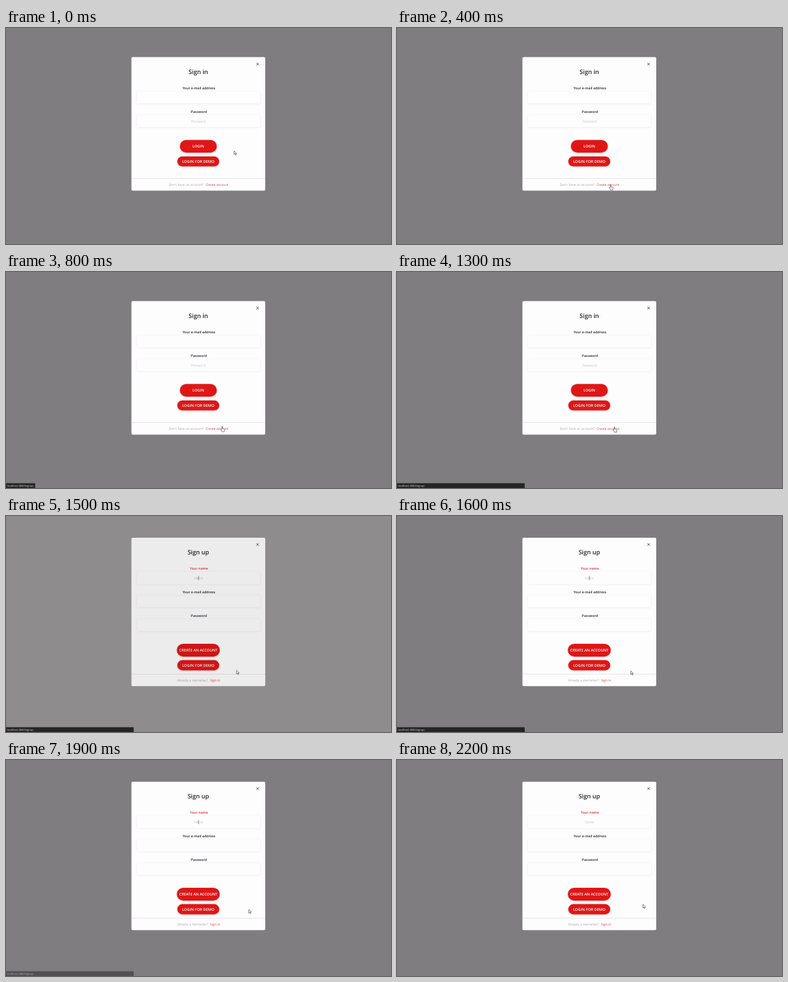
Write an HTML page that moves like this. It is 600x338 px and loops after 2400 ms.

```html
<!DOCTYPE html>
<html lang="en">
<head>
<meta charset="utf-8">
<title>Sign in to sign up</title>
<style>
html, body { margin: 0; width: 100%; height: 100%; overflow: hidden; background: #7f7d7f; }
svg { display: block; width: 100%; height: 100%; }
text { font-family: "Open Sans", "Noto Sans", sans-serif; text-rendering: geometricPrecision; }
</style>
</head>
<body>
<svg id="stage" viewBox="0 0 600 338" xmlns="http://www.w3.org/2000/svg"></svg>
<script>
const LOOP = 2400, STEP = 100;
const RED = '#df1719', INK = '#252427', GREY = '#a9a7aa';
const stage = document.getElementById('stage');

const label = (x, y, size, str, fill = INK, weight = 600, anchor = 'middle', id = '') =>
  `<text ${id && `id="${id}"`} x="${x}" y="${y}" font-size="${size}" font-weight="${weight}" fill="${fill}" text-anchor="${anchor}">${str}</text>`;

const box = (x, y, w, h, r, fill, extra = '') =>
  `<rect x="${x}" y="${y}" width="${w}" height="${h}" rx="${r}" fill="${fill}" ${extra}/>`;

const field = (y, hint = '') =>
  box(204, y, 192, 18.5, 2, '#fefdfe', 'filter="url(#soft)"') +
  (hint && label(300, y + 11, 5, hint, '#bfbdc0', 400));

const button = (x, y, w, h, str) =>
  box(x, y, w, h, h / 2, RED, 'filter="url(#lift)"') +
  label(x + w / 2, y + h / 2 + 2.1, 5.85, str, '#fff');

const cross = y =>
  `<path d="M390.2 ${y - 1.9}l3.8 3.8m0-3.8l-3.8 3.8" stroke="#333" stroke-width=".85" fill="none"/>`;

const footer = (y, ask, askX, link, linkX) =>
  box(195.5, y, 208.5, 1, 0, '#e6e4e7') +
  label(askX, y + 12, 5.05, ask, GREY, 400, 'start') +
  label(linkX, y + 12, 5.05, link, '#e23a3c', 400, 'start');

stage.innerHTML = `
  <defs>
    <filter id="soft" x="-5%" y="-40%" width="110%" height="180%">
      <feDropShadow dx="0" dy=".4" stdDeviation="1.7" flood-color="#504060" flood-opacity=".1"/>
    </filter>
    <filter id="lift" x="-10%" y="-30%" width="120%" height="170%">
      <feDropShadow dx="0" dy=".6" stdDeviation=".8" flood-color="#400" flood-opacity=".3"/>
    </filter>
  </defs>
  <rect id="back" width="600" height="338"/>
  <g id="signin">
    ${box(195.5, 45.5, 208.5, 209, 2, '#fefdfe')}
    ${cross(56.5)}
    ${label(299.7, 71.7, 9.5, 'Sign in')}
    ${label(300.6, 96, 5.4, 'Your e-mail address')}
    ${field(99.5)}
    ${label(300.6, 132.5, 5.4, 'Password')}
    ${field(136.5, 'Password')}
    ${button(271, 175.2, 57.5, 19.8, 'LOGIN')}
    ${button(267, 201, 65.3, 15.6, 'LOGIN FOR DEMO')}
    ${footer(235, 'Don\'t have an account?', 253.4, 'Create account', 311.2)}
  </g>
  <g id="signup">
    <rect id="panel" x="195.5" y="34" width="208.5" height="232.3" rx="2"/>
    <g id="form">
      ${cross(44.6)}
      ${label(299.7, 59.6, 9.5, 'Sign up')}
      ${label(300.7, 84, 5.4, 'Your name', INK, 600, 'middle', 'name')}
      ${field(87.7, 'Name')}
      ${box(299.6, 93.6, .8, 6.8, 0, '#666', 'id="caret"')}
      ${label(300.6, 120.7, 5.4, 'Your e-mail address')}
      ${field(124.3)}
      ${label(300.6, 157.5, 5.4, 'Password')}
      ${field(161.2)}
      ${button(266.3, 199.9, 66.8, 20, 'CREATE AN ACCOUNT')}
      ${button(267, 225.6, 65.3, 15.8, 'LOGIN FOR DEMO')}
      ${footer(247, 'Already a memeber?', 266.5, 'Sign in', 318)}
    </g>
    ${box(195.5, 34, 208.5, 232.3, 2, '#000', 'id="shade"')}
  </g>
  <g id="status">
    <rect id="bar" x="-2" y="330.5" height="10" rx="1" fill="#252526"/>
    ${label(1.4, 336, 4.05, 'localhost:3000/signup', '#dcdcdc', 400, 'start')}
  </g>
  <path id="arrow" d="M.3 .3V6l1.4-1.2 1 2.1.9-.4-1-2.1h1.9z" fill="#f8f8f8" stroke="#333" stroke-width=".6" stroke-linejoin="round"/>
  <path id="hand" d="M-.7 .8C-.7-.1 .5-.1 .5 .8V3.4L3 3.8Q3.9 4 3.8 5L3.4 7.2V8.4H-.6V7.4L-2.5 5Q-2.4 4-1.5 4.4L-.7 5.1Z" fill="#fff" stroke="#333" stroke-width=".6" stroke-linejoin="round"/>`;

const part = id => document.getElementById(id);
const set = (id, attrs) => {
  for (const k in attrs) part(id).setAttribute(k, attrs[k]);
};
const show = (id, on) => set(id, { opacity: +on });

// Pointer keys: time, x, y. Each place is held until the next key.
const trail = [
  [0, 355, 192], [100, 352, 203], [200, 343, 227], [300, 332, 246],
  [400, 333, 245], [500, 335, 243], [600, 337, 241.4], [1300, 339, 242.2],
  [1400, 345.8, 242.4], [1500, 359, 241.2], [1600, 364, 242], [1700, 369, 240.5],
  [1800, 374, 237.5], [1900, 378, 233.5], [2000, 381, 229], [2100, 382.5, 226.5],
  [2200, 383, 225.6]
];

function draw(ms) {
  const t = Math.floor(ms % LOOP / STEP) * STEP;
  const first = t === 1400, second = t === 1500;
  const signup = t >= 1400;

  set('back', { fill: first ? '#efeff0' : second ? '#8e8c8d' : '#7f7d7f' });
  show('signin', !signup);
  show('signup', signup);
  set('panel', { fill: first ? '#f2f0f1' : '#fefdfe' });
  set('form', { opacity: first ? .14 : 1 });
  set('shade', { opacity: second ? .065 : 0 });
  set('name', { fill: first ? INK : '#dc2f33' });
  show('caret', t >= 1500 && t < 2000);

  const fade = t < 700 || t >= 2000 ? 0 : t === 700 || t === 1900 ? .5 : 1;
  set('status', { opacity: fade });
  set('bar', { width: t < 1300 ? 47.5 : 201 });

  const [, x, y] = trail.filter(k => k[0] <= t).pop();
  const linked = t >= 300 && t < 1400;
  for (const id of ['arrow', 'hand']) set(id, { transform: `translate(${x} ${y})` });
  show('arrow', !linked);
  show('hand', linked);
}

const start = performance.now();
function tick() {
  draw(performance.now() - start);
  requestAnimationFrame(tick);
}
tick();
</script>
</body>
</html>
```
